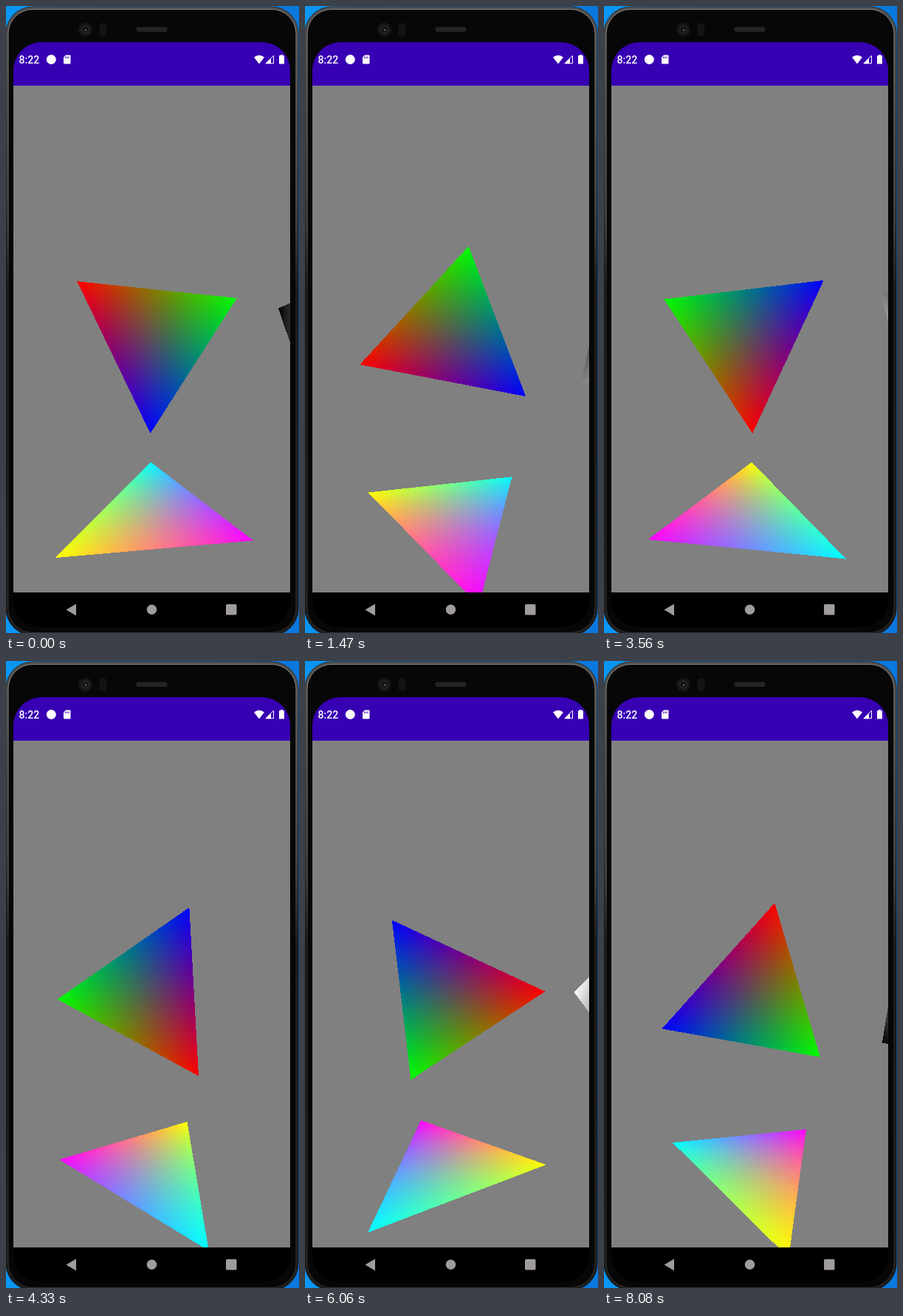
Animation, 397 px wide and 850 px high, one loop 8.15 s. Source, as an HTML page with a canvas:

```html
<!DOCTYPE html>
<html lang="en">
<head>
<meta charset="utf-8">
<title>Rotating triangles</title>
<style>
  html, body { margin: 0; width: 100%; height: 100%; overflow: hidden; background: #0a84ea; }
  svg, canvas { position: absolute; display: block; }
  svg { left: 0; top: 0; }
  canvas { left: 10px; top: 108px; }
</style>
</head>
<body>
<svg width="397" height="850" viewBox="0 0 397 850">
  <defs>
    <linearGradient id="sky">
      <stop offset="0" stop-color="#0a96f5"/><stop offset="1" stop-color="#0a78de"/>
    </linearGradient>
    <linearGradient id="rim" x2="0" y2="1">
      <stop offset="0" stop-color="#4c4c4c"/><stop offset=".3" stop-color="#333"/>
      <stop offset=".45" stop-color="#161616"/><stop offset="1" stop-color="#1c1c1c"/>
    </linearGradient>
    <linearGradient id="shine" x2="0" y2="1">
      <stop offset="0" stop-color="#8c8c8c"/><stop offset=".35" stop-color="#6a6a6a"/>
      <stop offset=".45" stop-color="#2c2c2c"/><stop offset="1" stop-color="#303030"/>
    </linearGradient>
  </defs>
  <rect width="397" height="850" fill="url(#sky)"/>
  <rect x="-.5" y=".5" width="397" height="853" rx="37" fill="#151515"/>
  <rect x="2" y="3" width="392" height="848" rx="34" fill="none" stroke="url(#rim)" stroke-width="4"/>
  <rect x="3" y="4.500" width="390" height="845" rx="33" fill="#070708" stroke="url(#shine)"/>

  <circle cx="107.500" cy="32" r="9.500" fill="#151515"/>
  <circle cx="107.500" cy="32" r="6" fill="#222324"/>
  <circle cx="107.500" cy="32" r="3.500" fill="#0c0d0e"/>
  <circle cx="108" cy="32.500" r="1.500" fill="#55585a"/>
  <rect x="126.500" y="23" width="10" height="18" rx="4.500" fill="#131313"/>
  <rect x="176.500" y="28.500" width="42" height="6.500" rx="3" fill="#242424"/>

  <path d="M10 108V87A38 38 0 0 1 48 49H347A38 38 0 0 1 385 87V108Z" fill="#3700b3"/>
  <path d="M10 795H385V806A36 36 0 0 1 349 842H46A36 36 0 0 1 10 806Z" fill="#000"/>

  <text x="17.500" y="78" font-family="Roboto, sans-serif" font-size="14" font-weight="500" fill="#fff">8:22</text>
  <g fill="#fff">
    <circle cx="61.300" cy="72.500" r="6.500"/>
    <path d="M81 66.500H86.500Q87.500 66.500 87.500 67.500V77.500Q87.500 78.500 86.500 78.500H79Q78 78.500 78 77.500V69.500Z"/>
    <path d="M336 69.500Q343 64 350 69.500L343 78.500Z"/>
    <path d="M352 77.700L362.500 67.200V77.700Z" fill="none" stroke="#fff"/>
    <path d="M351.500 78.200L359 70.700V78.200Z"/>
    <path d="M372 66H375V67.300H377V78.500H370V67.300H372Z"/>
  </g>
  <path d="M80.500 68.500V71M82.700 68.500V71M84.900 68.500V71" stroke="#3700b3"/>

  <g fill="#a09c9c">
    <path d="M81.500 818.500L95 810.500V826.500Z"/>
    <circle cx="197.500" cy="818.300" r="6.700"/>
    <rect x="298" y="811" width="14.500" height="14.500" rx="1.500"/>
  </g>
</svg>
<canvas width="375" height="687"></canvas>

<script>
const LOOP = 8150;
const STEPS = 105;
const LEAD = 20; // ms by which steps run ahead of an even beat
const START_ANGLE = 25.7;
const STEP_ANGLE = 2.812;

const RADIUS = Math.hypot(0.5, 0.25);
const SPREAD = 90 + Math.atan(0.5) * 180 / Math.PI;
const EYE = 1.5;

const canvas = document.querySelector('canvas');
const ctx = canvas.getContext('2d');
const { width: W, height: H } = canvas;
const image = ctx.createImageData(W, H);
const pixels = new Uint32Array(image.data.buffer);

// Each shape spins in its own plane: facing the eye, lying below, standing at the right.
const shapes = [
  { place: (x, y) => [x, y, 0], colors: [[255, 0, 0], [0, 0, 255], [0, 255, 0]] },
  { place: (x, y) => [x, -1, y], colors: [[255, 255, 0], [0, 255, 255], [255, 0, 255]] },
  { place: (x, y) => [1, y, -x], colors: [[255, 255, 255], [128, 128, 128], [0, 0, 0]] }
];

function project([x, y, z]) {
  const depth = EYE - z, scale = H / 2 / depth;
  return { x: W / 2 + x * scale, y: H / 2 - y * scale, depth };
}

const edge = (a, b, x, y) => (b.x - a.x) * (y - a.y) - (b.y - a.y) * (x - a.x);

function span(values, limit) {
  return [Math.max(0, Math.floor(Math.min(...values))), Math.min(limit, Math.ceil(Math.max(...values)))];
}

function fillTriangle([a, b, c], [ca, cb, cc]) {
  const [left, right] = span([a.x, b.x, c.x], W);
  const [top, bottom] = span([a.y, b.y, c.y], H);
  const area = edge(a, b, c.x, c.y);

  for (let row = top; row < bottom; row++) {
    for (let col = left; col < right; col++) {
      const x = col + 0.5, y = row + 0.5;
      let u = edge(b, c, x, y) / area, v = edge(c, a, x, y) / area, w = edge(a, b, x, y) / area;
      if (u < 0 || v < 0 || w < 0) continue;
      // perspective-correct weights
      u /= a.depth; v /= b.depth; w /= c.depth;
      const sum = u + v + w;
      const mix = k => Math.round((u * ca[k] + v * cb[k] + w * cc[k]) / sum);
      pixels[row * W + col] = 0xff000000 | mix(2) << 16 | mix(1) << 8 | mix(0);
    }
  }
}

function draw(step) {
  const angle = START_ANGLE + STEP_ANGLE * step;
  pixels.fill(0xff808080);
  for (const { place, colors } of shapes) {
    const corners = [SPREAD, -SPREAD, 0].map(offset => {
      const a = (angle + offset) * Math.PI / 180;
      return project(place(RADIUS * Math.cos(a), RADIUS * Math.sin(a)));
    });
    fillTriangle(corners, colors);
  }
  ctx.putImageData(image, 0, 0);
}

let shown = -1;
function tick() {
  const time = performance.now() % LOOP;
  const step = Math.min(STEPS - 1, Math.floor((time + LEAD) * STEPS / LOOP));
  if (step !== shown) draw(shown = step);
  requestAnimationFrame(tick);
}
tick();
</script>
</body>
</html>
```
